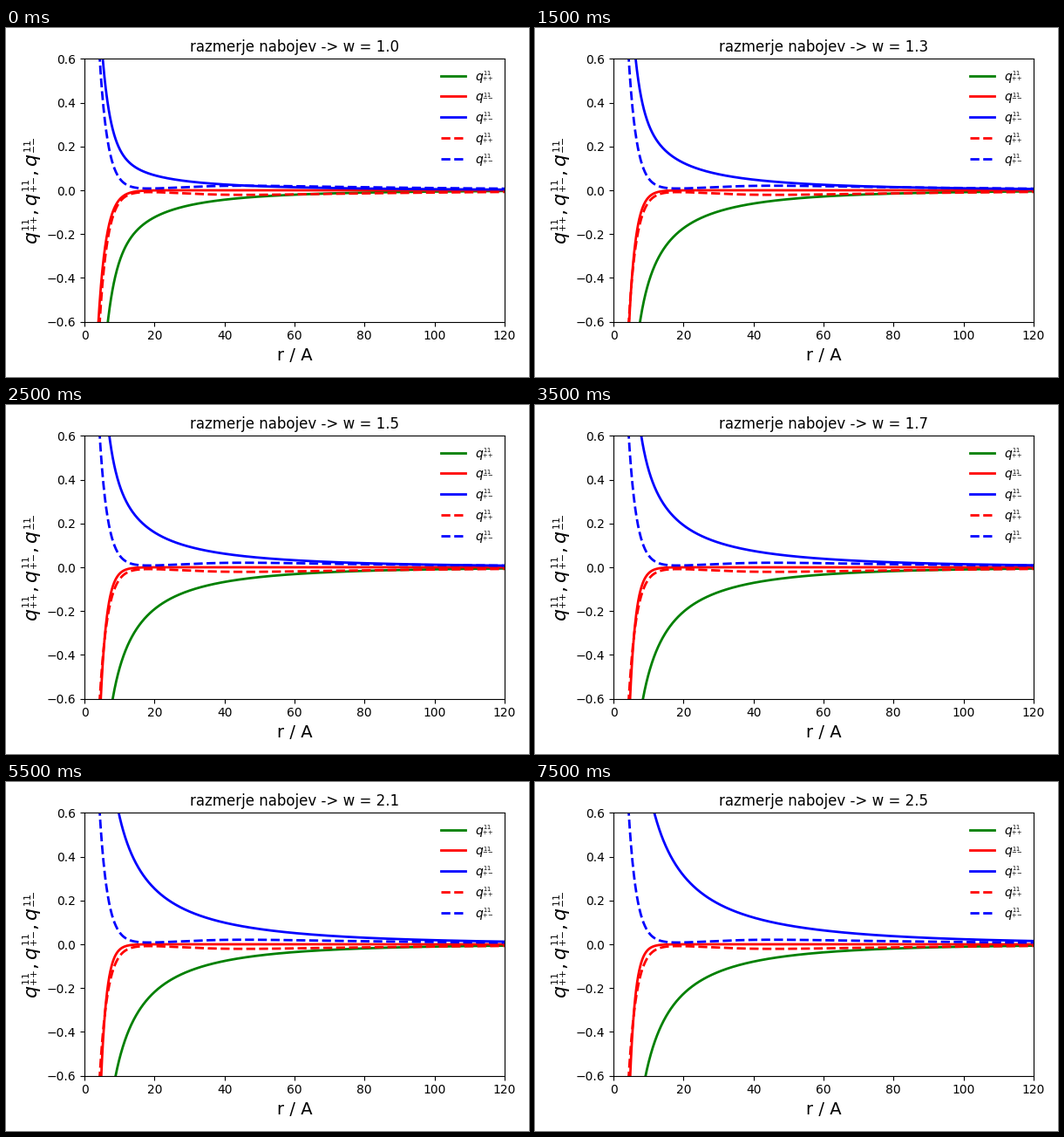
Recreate the animation shown at these times as a matplotlib script. Size 600 by 400 pixels, loop 8 s.

```python
import numpy as np
import matplotlib.pyplot as plt
from matplotlib.animation import FuncAnimation

plt.rcParams["text.kerning_factor"] = 6

FRAMES = 16
BJERRUM = 7.0
r = np.linspace(1, 120, 1200)


def q(signs):
    # Braces around each sign keep it from being spaced as an operator.
    sub = "".join("{%s}" % s for s in signs)
    return r"q_{^{%s}}^{_{11}}" % sub


def yukawa(amp, kappa):
    return amp * np.exp(-kappa * r) / r


def solid_curves(w):
    """Return the ++, -- and +- curves for charge ratio w."""
    reach = 4.92 - 0.98 * np.exp(-(w - 1) / 0.36) - 0.11 * (w - 1)
    short = 0.6 * np.exp(-(0.66 - 0.22 / w**2) * (r - reach))
    share = 1 - 0.5 / w**2
    pp = -yukawa(BJERRUM * share, 0.0178) - 0.72 / w**4 * short
    pm = yukawa(BJERRUM * w * share / 2, 0.0125) + 0.82 / w**1.4 * short
    return pp, -short, pm


def dashed_curve():
    near = 0.597 * np.exp(-0.433 * (r - 4.32))
    far = 0.048 * np.exp(-r / 65) / (1 + np.exp(-(r - 30) / 8))
    return near + far


fig, ax = plt.subplots(figsize=(6, 4), dpi=100)
fig.subplots_adjust(left=90.2 / 600, right=571.8 / 600,
                    bottom=63.4 / 400, top=364.6 / 400)

styles = [("green", "++"), ("red", "--"), ("blue", "+-")]
lines = [ax.plot([], [], color=c, lw=2, label=f"${q(s)}$")[0]
         for c, s in styles]
ref = dashed_curve()
ax.plot(r, -ref, "--", color="red", lw=2, label=f"${q('++')}$")
ax.plot(r, ref, "--", color="blue", lw=2, label=f"${q('+-')}$")

ax.set_xlim(0, 120)
ax.set_ylim(-0.6, 0.6)
ax.set_xlabel("r / A", fontsize=14)
ax.set_ylabel(f"${q('++')} , {q('+-')} , {q('--')}$", fontsize=16)
ax.legend(loc="upper right", frameon=False)
title = ax.set_title("razmerje nabojev -> w = 1.0")


def update(i):
    w = 1 + i / 10
    for line, y in zip(lines, solid_curves(w)):
        line.set_data(r, y)
    title.set_text(f"razmerje nabojev -> w = {w:.1f}")
    return [*lines, title]


anim = FuncAnimation(fig, update, frames=FRAMES, interval=500,
                     repeat=True, repeat_delay=0, blit=False)
plt.show()
```
